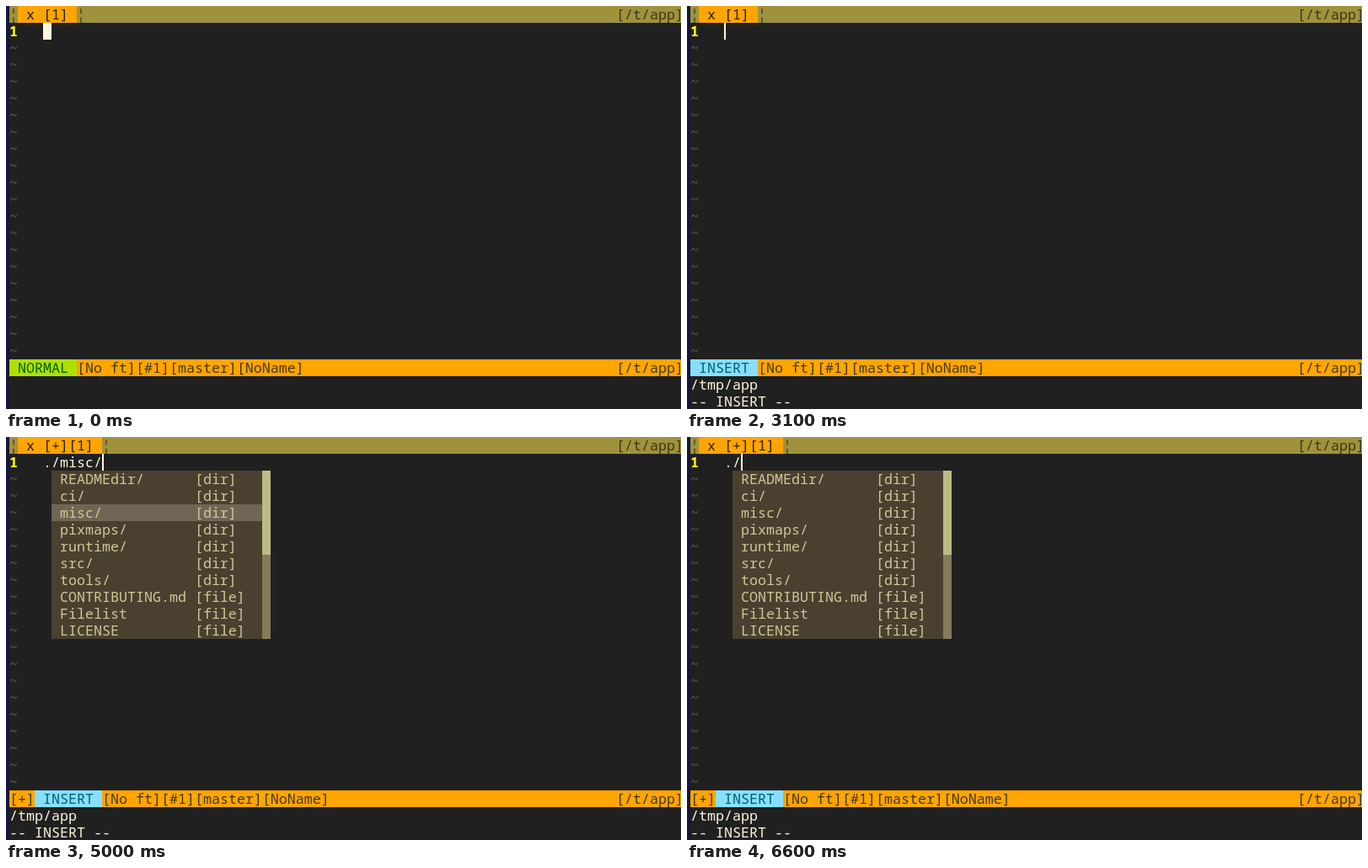
Animation of 801x479 px, one loop 8 s. Source, as an HTML page:

```html
<!DOCTYPE html>
<html lang="en">
<head>
<meta charset="utf-8">
<title>Path completion</title>
<style>
  html, body { margin: 0; width: 100%; height: 100%; overflow: hidden; background: #202020; }
  #screen { position: absolute; inset: 0; overflow: hidden; border-left: 4px solid #16163f; }
  #screen div {
    position: absolute; height: 20px; white-space: pre; color: #fff6dc;
    font: 500 16.6667px/20px "Noto Sans Mono", "DejaVu Sans Mono", monospace;
    font-variant-ligatures: none;
  }
  #screen .tabs { background: #a0923d; color: #3b3716; }
  #screen .tab { background: #ffa500; color: #262014; }
  #screen .status { background: #ffa500; color: #44381c; }
  #screen .normal { background: #aee000; color: #005f00; }
  #screen .insert { background: #87dfff; color: #005f6a; }
  #screen .number { color: #ffff00; font-weight: 700; }
  #screen .tilde { color: #5c5c5c; }
  #screen .menu { background: #4a4030; color: #d0c795; }
  #screen .picked { background: #6f6656; }
  #screen .track { background: #857a5a; }
  #screen .thumb { background: #bdbb85; }
  #screen .cursor { background: #fff6dc; }
</style>
</head>
<body>
<div id="screen"></div>
<script>
const LOOP = 8000, CELL = 10, LINE = 20, COLS = 80;
const screen = document.getElementById("screen");
const dirs = ["READMEdir/", "ci/", "misc/", "pixmaps/", "runtime/", "src/", "tools/"];
const files = ["CONTRIBUTING.md", "Filelist", "LICENSE"];
const entries = [...dirs.map(d => [d, "[dir]"]), ...files.map(f => [f, "[file]"])];

// Each step overrides part of the editor state from its time on.
const pick = (time, picked) => [time, { picked, text: "./" + (entries[picked]?.[0] ?? "") }];
const steps = [
  [0, { mode: "NORMAL", text: "", command: "", menu: false, picked: -1 }],
  [500, { mode: "COMMAND", command: ":" }],
  [1000, { command: ":p" }],
  [1100, { command: ":pw" }],
  [1200, { command: ":pwd" }],
  [1600, { mode: "NORMAL", command: "/tmp/app" }],
  [3100, { mode: "INSERT" }],
  [3600, { text: "." }],
  [3700, { text: "./" }],
  [4300, { menu: true }],
  pick(4700, 0), pick(4900, 1), pick(5000, 2), pick(5200, 3), pick(5300, 4), pick(5500, 5),
  pick(5700, 4), pick(5900, 3), pick(6000, 2), pick(6200, 1), pick(6400, 0), pick(6600, -1)
];

function put(col, row, text, kind = "", cols = text.length, rows = 1) {
  const box = document.createElement("div");
  box.className = kind;
  box.textContent = text;
  box.style.cssText =
    `left:${col * CELL}px;top:${row * LINE}px;width:${cols * CELL}px;height:${rows * LINE}px`;
  screen.append(box);
}

function drawBars({ mode, text }) {
  const tab = ` x ${text && "[+]"}[1] `;
  put(0, 0, "¦", "tabs", COLS);
  put(1, 0, tab, "tab");
  put(1 + tab.length, 0, "¦", "tabs");
  put(72, 0, "[/t/app]", "tabs");

  const flag = text && "[+]";
  const label = ` ${mode} `;
  put(0, 21, flag, "status", COLS);
  put(flag.length, 21, label, mode === "INSERT" ? "insert" : "normal");
  put(flag.length + label.length, 21, "[No ft][#1][master][NoName]", "status");
  put(72, 21, "[/t/app]", "status");
}

function drawMenu(picked) {
  entries.forEach(([name, type], i) =>
    put(5, 2 + i, ` ${name.padEnd(16)}${type}`, i === picked ? "menu picked" : "menu", 25));
  put(30, 2, "", "track", 1, 10);
  put(30, 2, "", "thumb", 1, 5);
}

function draw(state) {
  const { mode, text, command, menu, picked } = state;
  screen.replaceChildren();
  drawBars(state);
  put(0, 1, "1", "number");
  for (let row = 2; row < 21; row++) put(0, row, "~", "tilde");
  put(4, 1, text);
  put(0, 22, command);
  if (mode === "INSERT") put(0, 23, "-- INSERT --");
  if (menu) drawMenu(picked);

  if (mode === "COMMAND") put(command.length, 22, "", "cursor", 1);
  else put(4 + text.length, 1, "", "cursor", mode === "INSERT" ? 0.2 : 1);
}

let shown = 0;
function frame() {
  const time = performance.now() % LOOP;
  const past = steps.filter(([start]) => start <= time);
  if (past.length !== shown) {
    shown = past.length;
    draw(Object.assign({}, ...past.map(([, change]) => change)));
  }
  requestAnimationFrame(frame);
}
frame();
</script>
</body>
</html>
```
